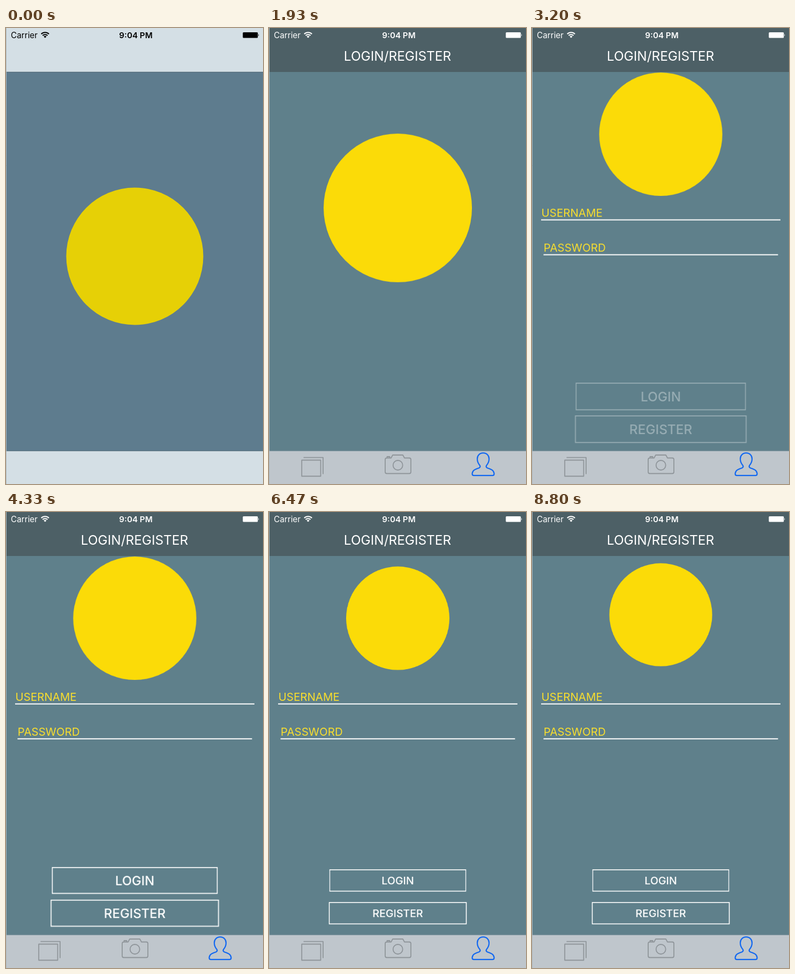
Recreate the animation shown at these times as an HTML page. Size 480 by 850 pixels, loop 8870 ms.

```html
<!DOCTYPE html>
<html lang="en">
<head>
<meta charset="utf-8">
<title>Login screen</title>
<style>
  html, body { margin: 0; width: 100%; height: 100%; overflow: hidden; background: #5f808b; }
  svg { display: block; width: 480px; height: 850px; }
  text { font-family: Inter, Roboto, sans-serif; }
  .mid { text-anchor: middle; }
  .launch, .tabs, .move, .size, .field, .button { animation: 8870ms linear infinite both; }

  .launch { animation-name: launch; }
  @keyframes launch {
    0%, 6.76% { opacity: 1; }
    12.74% { opacity: .12; }
    15%, 100% { opacity: 0; }
  }

  .tabs { animation-name: tabs; fill: none; stroke: #8f959a; stroke-width: 1.8; stroke-linejoin: round; }
  @keyframes tabs {
    0%, 6.76% { opacity: 0; }
    12.74%, 100% { opacity: 1; }
  }

  /* badge: rise to the top, then shrink in two stages */
  .move { animation-name: move; }
  @keyframes move {
    0%, 17.76% { transform: translate(240.5px, 425.3px); animation-timing-function: ease-in-out; }
    26.94%, 28.52% { transform: translate(240.5px, 196px); animation-timing-function: ease-out; }
    37%, 72.94% { transform: translate(240.5px, 198px); animation-timing-function: ease-in-out; }
    99.2%, 100% { transform: translate(240.5px, 191.5px); }
  }
  .size { animation-name: size; }
  @keyframes size {
    0%, 6.76% { transform: scale(1.333); }
    12.74% { transform: scale(1.402); animation-timing-function: ease-out; }
    15.8%, 21.8% { transform: scale(1.443); animation-timing-function: ease-in-out; }
    28.4%, 48.82% { transform: scale(1.198); animation-timing-function: ease-in-out; }
    61%, 72.94% { transform: scale(1.005); }
    99.2%, 100% { transform: scale(1); }
  }

  .field { animation-name: field; fill: #f9de2d; font-size: 20.5px; }
  .field path { stroke: #fff; stroke-width: 2; }
  @keyframes field {
    0%, 24.8% { opacity: 0; transform: translateY(-7px); }
    28.52% { opacity: .85; transform: translateY(-7px); animation-timing-function: ease-out; }
    30% { opacity: 1; }
    37%, 100% { opacity: 1; transform: none; }
  }

  .button { animation-name: button; fill: #fff; font-size: 19.6px; font-weight: 500; }
  .button rect { fill: none; stroke: #fff; stroke-width: 1.5; }
  @keyframes button {
    0%, 34% { opacity: 0; transform: scale(1.25); }
    40% { opacity: 1; }
    48.82% { transform: scale(var(--swell)); animation-timing-function: ease-in-out; }
    61%, 100% { opacity: 1; transform: none; }
  }
</style>
</head>
<body>
<svg viewBox="0 0 480 850">
  <defs>
    <g id="status" fill="currentColor">
      <text x="9" y="18.5" font-size="15.3">Carrier</text>
      <path d="M65.8 11.2a10.3 10.3 0 0 1 14.4 0M68.4 14a6.600 6.600 0 0 1 9.200 0" fill="none" stroke="currentColor" stroke-width="2"/>
      <path d="M70.4 15.9a3.8 3.8 0 0 1 5.2 0L73 18.6z"/>
      <text class="mid" x="242.5" y="18.5" font-size="15.2" font-weight="600">9:04 PM</text>
      <rect x="442.3" y="8" width="28" height="10.5" rx="1.5"/>
      <path d="M471.3 11.2q2 2 0 4z"/>
    </g>
  </defs>

  <rect width="480" height="850" fill="#5f808b"/>

  <g class="move"><circle class="size" r="96" fill="#fbdb08"/></g>

  <g class="field">
    <text x="17.5" y="352.3">USERNAME</text>
    <path d="M17 357.7H464"/>
  </g>
  <g class="field">
    <text x="21.8" y="417.3">PASSWORD</text>
    <path d="M21.5 422.8H459.5"/>
  </g>

  <g transform="translate(240.5 686.8)">
    <g class="button" style="--swell:1.212">
      <rect x="-127.2" y="-19.9" width="254.4" height="39.8"/>
      <text class="mid" y="7">LOGIN</text>
    </g>
  </g>
  <g transform="translate(240.5 747.8)">
    <g class="button" style="--swell:1.222">
      <rect x="-128" y="-19.9" width="256" height="39.8"/>
      <text class="mid" y="7">REGISTER</text>
    </g>
  </g>

  <rect width="480" height="82" fill="#4d6066"/>
  <text class="mid" x="240" y="61.2" font-size="24.4" fill="#fff">LOGIN/REGISTER</text>
  <use href="#status" color="#fff"/>

  <rect y="788" width="480" height="62" fill="#bfc6cc"/>
  <path d="M0 788.2H480" stroke="#6f8793"/>

  <g class="launch">
    <rect width="480" height="850" fill="#5e7c8e"/>
    <circle cx="240.5" cy="425.5" r="128" fill="#e6d006"/>
    <path d="M0 0H480V82H0zM0 788H480V850H0z" fill="#d4dfe5"/>
    <path d="M0 82.2H480M0 788.2H480" stroke="#49626f"/>
    <use href="#status" color="#000"/>
  </g>

  <g class="tabs">
    <path d="M61.2 805.5H96.5V835.5H61.2zM64.5 800.7H101V831.5"/>
    <path d="M220 801.5h8l3-5.500h19l3 5.500h9a3 3 0 0 1 3 3v23a3 3 0 0 1-3 3H220a3 3 0 0 1-3-3v-23a3 3 0 0 1 3-3zM220.5 801v-2h5v2"/>
    <circle cx="240.7" cy="815" r="9"/>
    <path stroke="#1268f0" stroke-width="2.2" d="M400 792.2c-7 0-11 5-11 11 0 5 2 9 5 12.500 1 2 0 3.500-2 4.500-7 2.500-12 4-12.500 10.500q0 3.500 3 3.500h35q3 0 3-3.500c-.5-6.500-5.500-8-12.500-10.500-2-1-3-2.500-2-4.500 3-3.500 5-7.500 5-12.500 0-6-4-11-11-11z"/>
  </g>

  <path d="M.5 0V850" stroke="#aeb9be"/>
</svg>
</body>
</html>
```
